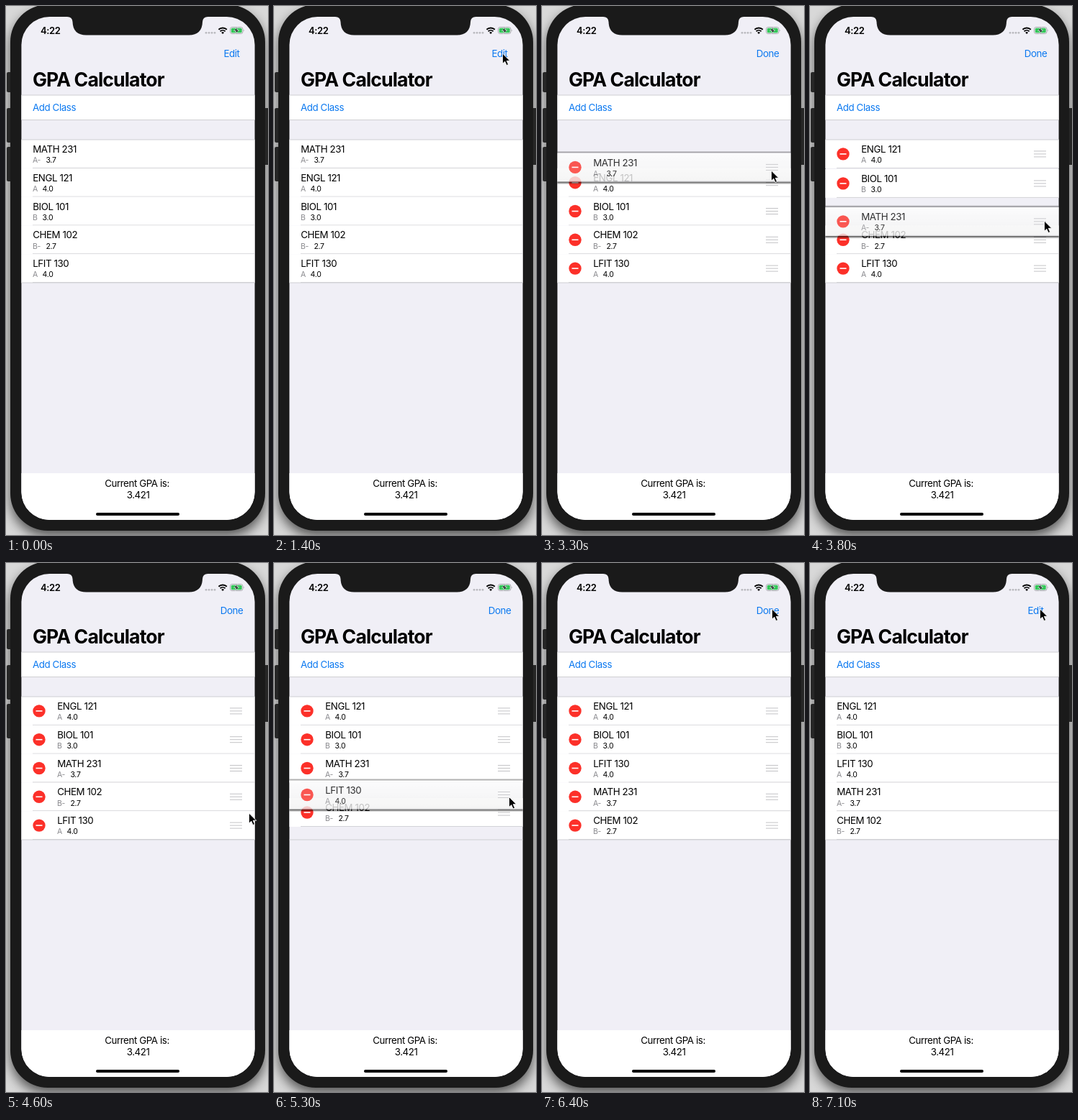
An HTML page for the animation above (7.2 s loop, 364 by 736 pixels).

```html
<!DOCTYPE html>
<html lang="en">
<head>
<meta charset="utf-8">
<title>GPA list</title>
<style>
  html, body { margin: 0; width: 100%; height: 100%; overflow: hidden; background: #aaa; }
  svg { display: block; }
  text { font: 13.3px Inter, "Liberation Sans", sans-serif; letter-spacing: -0.03em; }
  .small { font-size: 10.5px; }
  .clock { font-size: 13px; font-weight: 600; }
  .title { font-size: 26.6px; font-weight: 700; letter-spacing: -0.033em; }
  .mid { text-anchor: middle; }
  .blue { fill: #0a78f0; }
  .grey { fill: #8a8a8e; }
  .line { fill: #cfcfd3; }
</style>
</head>
<body>
<svg width="364" height="736" viewBox="0 0 364 736">
  <defs>
    <linearGradient id="up" x2="0" y2="1">
      <stop stop-opacity="0"/><stop offset="1" stop-opacity=".6"/>
    </linearGradient>
    <linearGradient id="down" x2="0" y2="1">
      <stop stop-opacity=".95"/><stop offset="1" stop-opacity="0"/>
    </linearGradient>
    <linearGradient id="inner" x2="0" y2="1">
      <stop stop-opacity="0"/><stop offset="1" stop-opacity=".05"/>
    </linearGradient>
    <filter id="blur"><feGaussianBlur stdDeviation="8"/></filter>
    <clipPath id="screen"><rect x="21.4" y="15" width="324.2" height="700" rx="39"/></clipPath>
  </defs>

  <!-- phone body -->
  <rect width="364" height="736" fill="#d8d8d8"/>
  <rect x="6" y="6" width="354" height="732" rx="52" opacity=".6" filter="url(#blur)"/>
  <g fill="#262626">
    <rect x="1" y="92" width="8" height="28" rx="2"/>
    <rect x="1" y="142" width="8" height="48" rx="2"/>
    <rect x="1" y="196" width="8" height="48" rx="2"/>
    <rect x="357" y="142" width="9" height="79" rx="2"/>
  </g>
  <rect x="6" y="-2" width="354" height="732" rx="52" fill="#1a1a1a"/>

  <g clip-path="url(#screen)">
    <rect x="21" y="15" width="325" height="700" fill="#f0eff6"/>
    <rect x="21" y="124" width="325" height="34" fill="#fff"/>
    <rect class="line" x="21" y="123.5" width="325" height="1"/>
    <rect class="line" x="21" y="158" width="325" height="1"/>
    <rect x="21" y="650" width="325" height="65" fill="#fff"/>
    <text class="title" x="37" y="111.5">GPA Calculator</text>
    <text class="blue" x="37" y="146">Add Class</text>
    <text class="blue mid" id="edit" x="313.5" y="71">Edit</text>
    <text class="blue mid" id="done" x="313.5" y="71">Done</text>
    <text class="mid" x="182" y="669">Current GPA is:</text>
    <text class="mid" x="183.6" y="685">3.421</text>
    <rect x="125" y="705" width="116" height="4" rx="2"/>

    <g id="list"></g>
    <rect class="line" id="top" x="21" y="185.5" width="325" height="1"/>
    <rect class="line" x="21" y="384.5" width="325" height="1"/>

    <!-- status bar -->
    <text class="clock" x="48" y="38.7">4:22</text>
    <g fill="#b9b9be">
      <circle cx="278" cy="37.3" r="1.4"/><circle cx="282" cy="37.3" r="1.4"/>
      <circle cx="286" cy="37.3" r="1.4"/><circle cx="290" cy="37.3" r="1.4"/>
    </g>
    <g fill="none" stroke="#000" stroke-width="1.9">
      <path d="M295.4 32.8a8.2 8.2 0 0 1 11.4 0M297.6 35.3a5 5 0 0 1 7 0"/>
      <path d="M299.2 37a2.8 2.8 0 0 1 3.8 0L301.1 39z" fill="#000" stroke="none"/>
    </g>
    <rect x="311.5" y="29.5" width="17.5" height="9" rx="2.6" fill="#f0eff6" stroke="#a2a2a6" stroke-width=".9"/>
    <rect x="312.8" y="30.8" width="14.9" height="6.4" rx="1.5" fill="#34c759"/>
    <path d="M330.2 32.4q1.6 1.6 0 3.2z" fill="#a2a2a6"/>
    <path d="M321.6 29.6l-4.8 5h3l-1 4 4.8-5.2h-3z" stroke="#f0eff6" stroke-width=".7"/>
  </g>
  <path fill="#1a1a1a" d="M85 14v1q7 0 7.500 7q.5 18.500 19 18.500h142q19 0 19.500-18.500q.5-7 7.500-7v-1z"/>

  <path id="cursor" d="M.5 0v14.200l3.300-3 2.300 5.300 2.500-1.100-2.300-5.100h4.500z" stroke="#fff" stroke-width=".9"/>
</svg>

<script>
const LOOP = 7200, STEP = 100, TOP = 186, ROW = 39.8;
const $ = id => document.getElementById(id);

// eased 0..1 between times a and b
const ramp = (t, a, b) => {
  const p = Math.min(1, Math.max(0, (t - a) / (b - a)));
  return p * p * (3 - 2 * p);
};

// piecewise linear value through [time, value] keys
const path = (t, keys) => {
  if (t <= keys[0][0]) return keys[0][1];
  for (let i = 1; i < keys.length; i++) {
    const [a, u] = keys[i - 1], [b, v] = keys[i];
    if (t < b) return u + (v - u) * (t - a) / (b - a);
  }
  return keys[keys.length - 1][1];
};

const still = () => 0;

// slot: place in the list over time; lift: 1 while the row is carried
const rows = [
  { name: 'ENGL 121', grade: 'A', points: '4.0', lift: still, slot: t => 1 - ramp(t, 3320, 3620) },
  { name: 'BIOL 101', grade: 'B', points: '3.0', lift: still, slot: t => 2 - ramp(t, 3500, 3835) },
  { name: 'CHEM 102', grade: 'B-', points: '2.7', lift: still, slot: t => 3 + ramp(t, 5130, 5450) },
  { name: 'MATH 231', grade: 'A-', points: '3.7',
    lift: t => ramp(t, 3100, 3250) - ramp(t, 4000, 4250),
    slot: t => path(t, [[3100, 0], [3200, .2], [3300, .465], [3800, 2.36], [4000, 2.36], [4250, 2]])
      + ramp(t, 5420, 5720) },
  { name: 'LFIT 130', grade: 'A', points: '4.0',
    lift: t => ramp(t, 4650, 4800) - ramp(t, 5750, 6000),
    slot: t => path(t, [[4850, 4], [5600, 2.216], [5750, 2.1], [6000, 2]]) }
];

const cursorX = [[800, 330], [1400, 317], [2400, 317], [3300, 318], [3800, 325], [4100, 327],
  [4600, 337], [4800, 331], [5600, 323], [6300, 319]];
const cursorY = [[800, 588], [1400, 66], [2400, 66], [2900, 209], [3100, 211], [3300, 229], [3800, 299],
  [4100, 299], [4600, 348], [4800, 366], [4900, 366], [5600, 295], [5800, 292], [6300, 64]];

$('list').innerHTML = rows.map(r => `<g>
  <g class="shade">
    <rect x="21" y="-3" width="325" height="3" fill="url(#up)"/>
    <rect x="21" y="${ROW}" width="325" height="4" fill="url(#down)"/>
  </g>
  <rect x="21" width="325" height="${ROW}" fill="#fff"/>
  <rect class="shade" x="21" width="325" height="${ROW}" fill="url(#inner)"/>
  <rect class="line" x="37" y="${ROW - .9}" width="309" height=".9"/>
  <g class="body">
    <g class="tool"><circle cx="12" cy="19.9" r="8.7" fill="#fc3029"/>
      <rect x="7.5" y="19.1" width="9" height="1.6" fill="#fff"/></g>
    <text x="37.2" y="18">${r.name}</text>
    <text class="small grey" x="37" y="32.2">${r.grade}</text>
    <text class="small" x="${r.grade.length > 1 ? 55.4 : 50.6}" y="32.2">${r.points}</text>
  </g>
  <path class="tool" d="M311 15.9h17m-17 4h17m-17 4h17" stroke="#c3c3c6"/>
</g>`).join('');

rows.forEach((r, i) => {
  r.node = $('list').children[i];
  r.body = r.node.querySelector('.body');
  r.shades = r.node.querySelectorAll('.shade');
  r.tools = r.node.querySelectorAll('.tool');
});

const move = (node, x, y) => node.setAttribute('transform', `translate(${x} ${y})`);
const fade = (node, a) => node.setAttribute('opacity', a);

function draw(t) {
  const editing = ramp(t, 2050, 2480) - ramp(t, 6450, 6850);
  fade($('edit'), 1 - editing);
  fade($('done'), editing);
  fade($('top'), t >= 3200 && t < 3450 ? 0 : 1);
  for (const r of rows) {
    const lift = r.lift(t);
    move(r.node, 0, TOP + ROW * r.slot(t));
    fade(r.node, 1 - .2 * lift);
    move(r.body, 34 * editing, 0);
    r.shades.forEach(n => fade(n, lift));
    r.tools.forEach(n => fade(n, editing));
  }
  fade($('cursor'), t < 800 ? 0 : 1);
  move($('cursor'), path(t, cursorX), path(t, cursorY));
}

const start = performance.now();
function tick() {
  const t = (performance.now() - start) % LOOP;
  draw(Math.floor(t / STEP) * STEP);
  requestAnimationFrame(tick);
}
tick();
</script>
</body>
</html>
```
